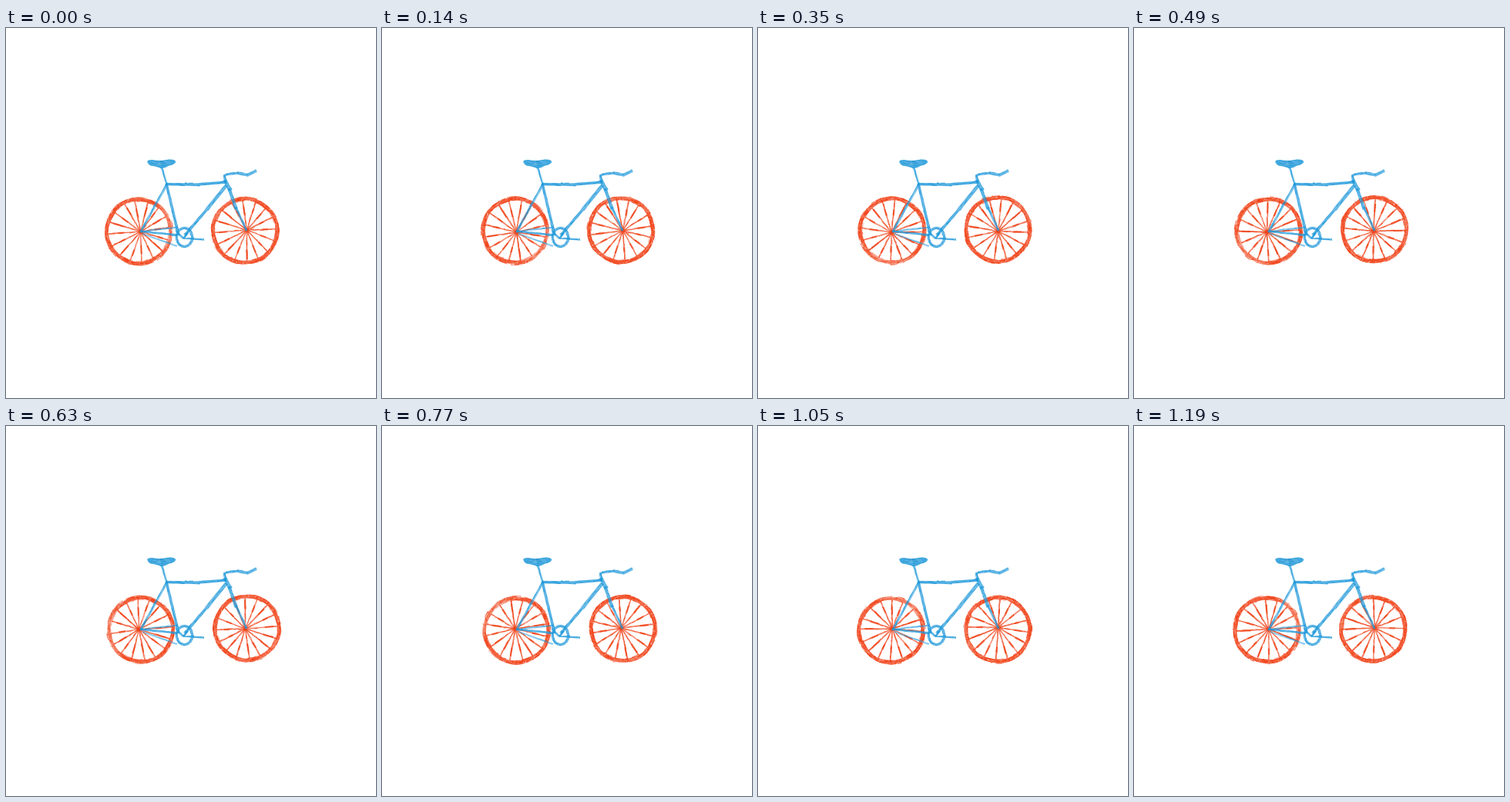
An HTML page with a canvas for the animation above (1.26 s loop, 480 by 480 pixels).

```html
<!DOCTYPE html>
<html lang="en">
<head>
<meta charset="utf-8">
<title>Bicycle</title>
<style>
html, body { margin: 0; width: 100%; height: 100%; overflow: hidden; background: #fff; }
canvas { display: block; }
</style>
</head>
<body>
<canvas id="stage" width="480" height="480"></canvas>
<script>
const ctx = document.getElementById('stage').getContext('2d');
const TAU = Math.PI * 2, RAD = Math.PI / 180;
const STEP = 70, STEPS = 18;
const RED = '#f04116', BLUE = '#2099da';

let seed = 1;
function rnd(lo = 0, hi = 1) {
  seed = (seed * 16807) % 2147483647;
  return lo + (hi - lo) * seed / 2147483647;
}

function line(points, width, color, alpha = 1) {
  ctx.globalAlpha = alpha;
  ctx.lineWidth = width;
  ctx.strokeStyle = color;
  ctx.beginPath();
  for (const [x, y] of points) ctx.lineTo(x, y);
  ctx.stroke();
}

function arc(r, from, to, width, color, alpha) {
  ctx.globalAlpha = alpha;
  ctx.lineWidth = width;
  ctx.strokeStyle = color;
  ctx.beginPath();
  ctx.arc(0, 0, r, from, to);
  ctx.stroke();
}

function dot(x, y, r, color, alpha) {
  ctx.globalAlpha = alpha;
  ctx.fillStyle = color;
  ctx.beginPath();
  ctx.arc(x, y, r, 0, TAU);
  ctx.fill();
}

const polar = (r, a) => [r * Math.cos(a), r * Math.sin(a)];
const mix = (a, b, k) => [a[0] + (b[0] - a[0]) * k, a[1] + (b[1] - a[1]) * k];

// Crayon stroke from a to b: a soft base with uneven grain on top
function crayon(a, b, width, color, alpha = 0.8) {
  const len = Math.hypot(b[0] - a[0], b[1] - a[1]);
  const dx = (b[0] - a[0]) / len, dy = (b[1] - a[1]) / len;
  const at = (s, off) => [a[0] + dx * s - dy * off, a[1] + dy * s + dx * off];
  line([a, b], width, color, alpha * 0.8);
  for (let s = 0; s < len; s += 2.5) {
    const off = rnd(-0.5, 0.5) * width;
    const end = Math.min(len, s + rnd(2, 7));
    line([at(s, off), at(end, off + rnd(-0.4, 0.4))], rnd(0.6, 1.3), color, alpha * rnd(0.3, 1));
  }
}

function rim(paleAt, fade) {
  const ink = a => 1 - fade * Math.max(0, Math.cos(a - paleAt)) ** 3;
  for (let i = 0; i < 36; i++) {
    const a = i * TAU / 36;
    const r = 41.5 + 0.5 * Math.sin(a * 5 + paleAt);
    arc(r, a, a + TAU / 36 + 0.01, 4.6, RED, 0.76 * ink(a));
  }
  for (let i = 0; i < 200; i++) {
    const a = rnd(0, TAU);
    arc(rnd(38.6, 44.5), a, a + rnd(0.06, 0.28), rnd(0.5, 1.1), RED, rnd(0.35, 0.95) * ink(a));
  }
  // Slanted hatching with paper showing through
  for (let i = 0; i < 130; i++) {
    const a = rnd(0, TAU), r = rnd(39, 43);
    const inked = rnd() < 0.6;
    line([polar(r, a), polar(r + rnd(1.5, 2.6), a + rnd(0.02, 0.06))], 0.6,
      inked ? RED : '#fff', inked ? 0.75 : 0.5);
  }
}

function wheel(x, y, turn, { shift, phase, pale, fade, salt }) {
  seed = salt;
  ctx.save();
  ctx.translate(x, y);
  ctx.rotate(turn);
  const [sx, sy] = polar(1.4, shift * RAD);
  ctx.save();
  ctx.translate(sx, sy);
  rim(pale * RAD, fade);
  ctx.restore();
  const hub = [-sx * 0.8, -sy * 0.8];
  for (let i = 0; i < 16; i++) {
    const [ex, ey] = polar(39.5, (phase + i * 22.5) * RAD + rnd(-0.025, 0.025));
    const tip = [ex + sx, ey + sy];
    crayon(hub, tip, rnd(1.3, 1.8), RED, rnd(0.6, 0.8));
    const mid = rnd(0.45, 0.65);
    line([mix(hub, tip, mid), mix(hub, tip, mid + rnd(0.15, 0.35))], 2.2, RED, 0.7);
  }
  dot(...hub, 2.6, RED, 0.8);
  ctx.restore();
}

function saddle() {
  ctx.globalAlpha = 0.85;
  ctx.fillStyle = BLUE;
  ctx.fill(new Path2D('M183.2 173 Q184 170.8 190 171 Q200 173 211 170.5 Q219 169.8 220.3 173.5 ' +
    'Q219 177.3 211 178.8 Q206 182.5 201 182.3 Q196 179.5 188 178.8 Q184 177 183.2 173Z'));
  for (let i = 0; i < 18; i++) {
    const x = rnd(186, 208), y = rnd(173, 178);
    line([[x, y], [x + rnd(4, 9), y + rnd(-1.5, 1)]], 0.6, i % 2 ? '#8fcbed' : '#1588c8', 0.7);
  }
}

function frame() {
  seed = 77;
  const rear = [175, 264], front = [311.5, 262], seat = [208.5, 203];
  crayon(rear, [223, 258.5], 2, BLUE, 0.55);
  crayon([177, 267], [222, 283], 2, BLUE, 0.5);
  crayon(rear, [222, 268.5], 2.6, BLUE, 0.8);
  crayon(seat, rear, 3, BLUE, 0.7);
  crayon([202, 181], [209, 204], 2.5, BLUE, 0.8);
  crayon([208, 202], [224, 269], 3.5, BLUE, 0.85);
  crayon([207, 202.5], [246, 203.2], 3.6, BLUE, 0.95);
  crayon([246, 203.2], [286, 200], 3.6, BLUE, 0.95);
  crayon([286, 204], [260, 236], 4.5, BLUE, 0.82);
  crayon([260, 236], [232, 269], 3.5, BLUE, 0.87);
  crayon([284, 197], [291, 211], 5, BLUE, 0.85);
  crayon([289, 208], [299, 235], 4, BLUE, 0.85);
  crayon([298, 232], front, 3, BLUE, 0.75);
  crayon([285, 201], [283, 191.5], 3, BLUE, 0.87);
  crayon([282.5, 192], [287, 189.5], 2.8, BLUE, 0.87);
  crayon([286, 190], [302, 188], 3, BLUE, 0.85);
  crayon([301, 188], [314, 191], 3.6, BLUE, 0.82);
  crayon([313, 191], [325, 185], 4, BLUE, 0.78);
  saddle();

  // Chainring and crank
  const ring = k => {
    const [x, y] = polar(1, k * TAU / 26);
    return [231.5 + 10.2 * x, 271.5 + 12.2 * y];
  };
  for (let i = 0; i < 26; i++) crayon(ring(i), ring(i + 1.1), 3.3, BLUE, 0.82);
  crayon([223, 266], [230, 273], 2.6, BLUE, 0.82);
  crayon([236, 266], [230, 273], 2.4, BLUE, 0.9);
  crayon([230, 273], [244, 273.5], 2.1, BLUE, 0.8);
  crayon([243, 273.5], [257, 274.5], 2.3, BLUE, 0.75);
  dot(...rear, 1.8, BLUE, 0.6);
  dot(...front, 1.8, BLUE, 0.6);
}

function draw(now) {
  const turn = Math.floor(now / STEP) % STEPS * TAU / STEPS;
  ctx.globalAlpha = 1;
  ctx.fillStyle = '#fff';
  ctx.fillRect(0, 0, 480, 480);
  wheel(173.6, 264, turn, { shift: 188, phase: 16.5, pale: -10, fade: 0.35, salt: 421 });
  wheel(311.4, 262.6, turn, { shift: 160, phase: 19, pale: 200, fade: 0.1, salt: 1973 });
  frame();
}

const start = performance.now();
function tick() {
  draw(performance.now() - start);
  requestAnimationFrame(tick);
}
tick();
</script>
</body>
</html>
```
